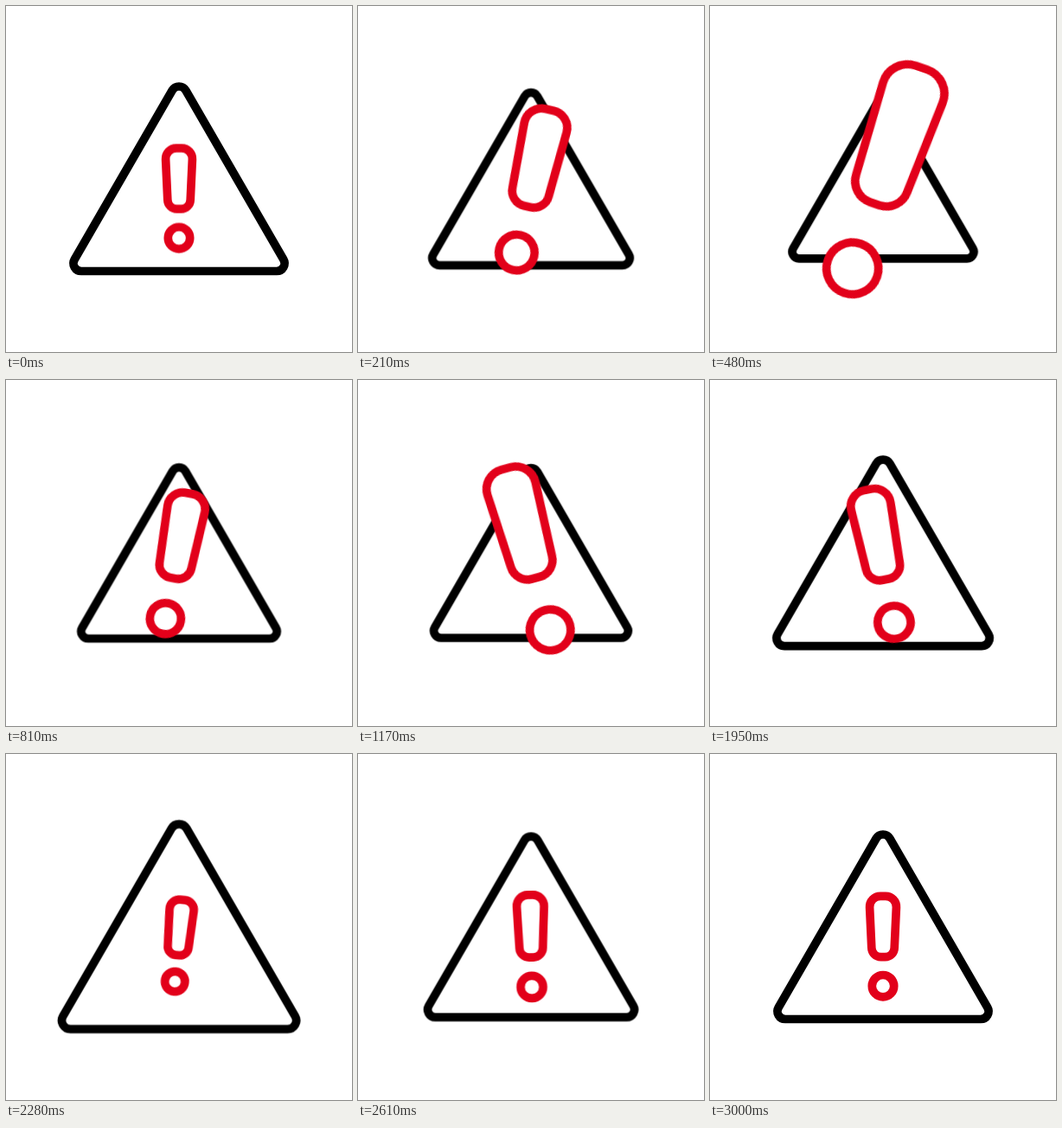
Animation of 400 by 400 pixels, one loop 3030 ms. Source, as an HTML page without scripts:

```html
<!DOCTYPE html>
<html lang="en">
<head>
<meta charset="utf-8">
<title>Warning sign</title>
<style>
/* The mark's matrix is blended entry by entry, so its points move on straight lines. */
@property --a { syntax: "<number>"; inherits: false; initial-value: 1; }
@property --b { syntax: "<number>"; inherits: false; initial-value: 0; }
@property --x { syntax: "<number>"; inherits: false; initial-value: 200; }
@property --y { syntax: "<number>"; inherits: false; initial-value: 199.5; }

html, body {
  margin: 0;
  width: 100%;
  height: 100%;
  overflow: hidden;
  background: #fff;
}
svg {
  display: block;
  width: 100%;
  height: 100%;
}
path, circle {
  fill: #fff;
  stroke-width: 9.7px;
  stroke-linejoin: round;
  vector-effect: non-scaling-stroke;
}
.sign, .mark {
  transform-origin: 0 0;
  animation: 3.03s infinite cubic-bezier(.33, 0, .67, 1);
}
.sign {
  stroke: #000;
  animation-name: pulse;
}
.mark {
  stroke: #e2001a;
  transform: matrix(var(--a), var(--b), calc(-1 * var(--b)), var(--a), var(--x), var(--y));
  animation-name: grow, tilt, drift;
}

@keyframes pulse {
  0%, 99%, 100% { transform: translate(200px, 202px) scale(1); }
  14.8% { transform: translate(200px, 202px) scale(.859); }
  31% { transform: translate(200px, 202px) scale(.941); }
  54.1% { transform: translate(200px, 202px) scale(.86); }
  72.9% { transform: translate(200px, 202px) scale(1.122); }
  86.8% { transform: translate(200px, 202px) scale(.978); }
}
@keyframes grow {
  0%, 99%, 100% { --a: 1; --y: 199.5; }
  14.5% { --a: 2.25; --y: 149.3; animation-timing-function: cubic-bezier(.333, .02, .667, .3); }
  29.4% { --a: .965; --y: 195.5; animation-timing-function: cubic-bezier(.333, .767, .667, 1); }
  54.1% { --a: 2.24; --y: 149.6; }
  72.9% { --a: .9; --y: 200.7; }
  86.8% { --a: 1.025; --y: 199; }
}
@keyframes tilt {
  0%, 99%, 100% { --b: 0; }
  14.5% { --b: .778; animation-timing-function: cubic-bezier(.333, .02, .667, .36); }
  29.4% { --b: .03; animation-timing-function: cubic-bezier(.333, .69, .667, 1); }
  54.1% { --b: -.815; }
  72.9% { --b: .095; }
  86.8% { --b: -.02; }
}
@keyframes drift {
  0%, 99%, 100% { --x: 200; }
  14.5% { --x: 218.2; animation-timing-function: cubic-bezier(.333, .1, .667, .6); }
  29.4% { --x: 198; animation-timing-function: cubic-bezier(.333, .57, .667, 1); }
  54.1% { --x: 181; }
  72.9% { --x: 201.3; }
  86.8% { --x: 199.7; }
}
</style>
</head>
<body>
<svg viewBox="0 0 400 400">
  <path class="sign" d="M-113 104.5H113A9 9 0 0 0 120.8 91L7.8-104.5A9 9 0 0 0-7.8-104.5L-120.8 91A9 9 0 0 0-113 104.5Z"/>
  <g class="mark">
    <path d="M-3-35.2H3A12.5 12.5 0 0 1 15.4-22.2L13.2 24.7A10.8 10.8 0 0 1 2.5 35.2H-2.5A10.8 10.8 0 0 1-13.2 24.7L-15.4-22.2A12.5 12.5 0 0 1-3-35.2Z"/>
    <circle cy="68.7" r="12.7"/>
  </g>
</svg>
</body>
</html>
```
